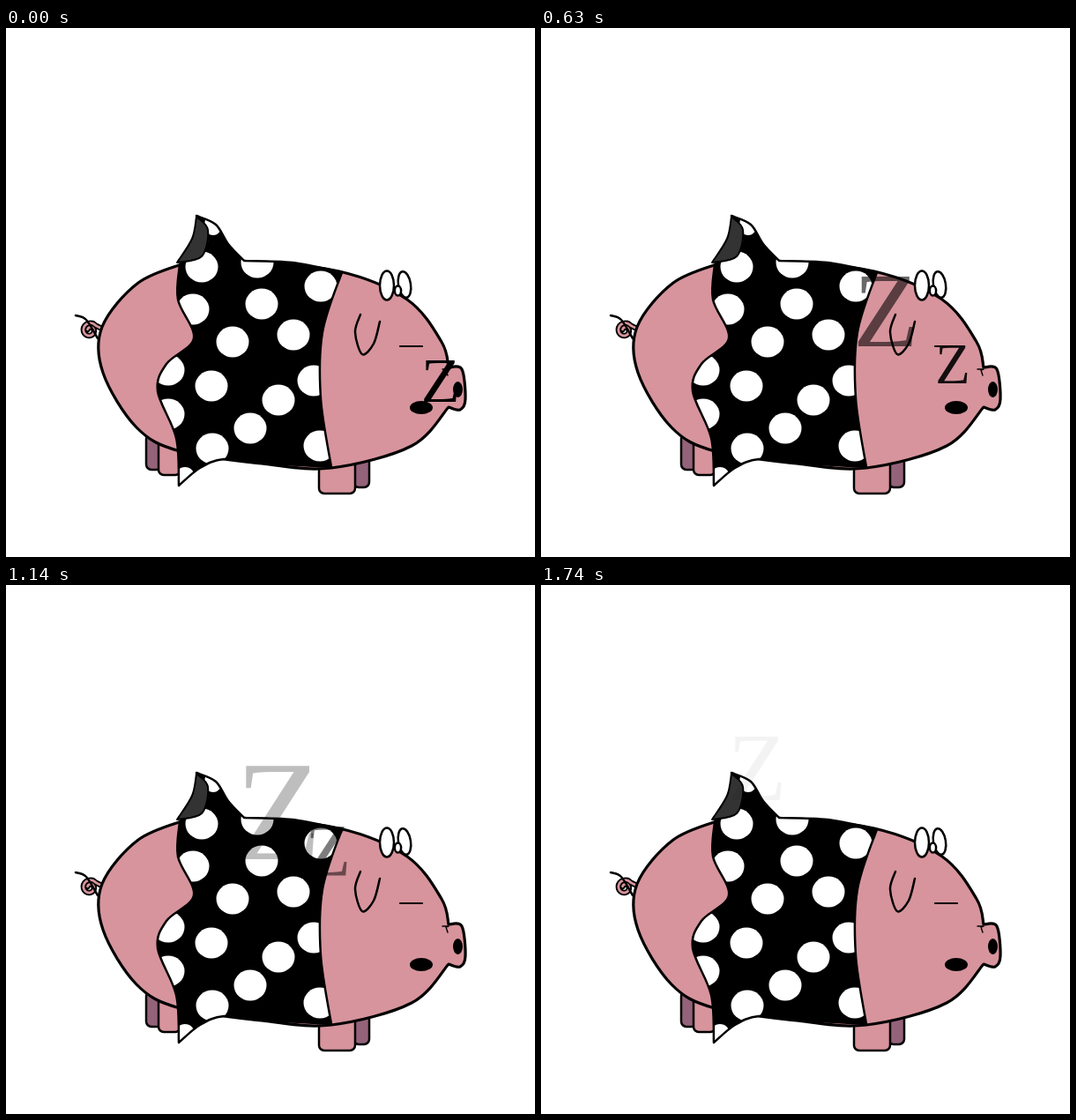
An HTML page with a canvas for the animation above (1800 ms loop, 600 by 600 pixels).

```html
<!DOCTYPE html>
<html lang="en">
<head>
<meta charset="utf-8">
<title>Sleeping pig</title>
<style>
html, body { margin: 0; width: 100%; height: 100%; overflow: hidden; background: #fff; }
canvas { display: block; width: 600px; height: 600px; }
</style>
</head>
<body>
<canvas id="stage" width="600" height="600"></canvas>
<script>
const LOOP = 1800, STEP = 30;
const PINK = '#d7949c', SHADE = '#94637a', INK = '#000', WHITE = '#fff';
const ctx = document.getElementById('stage').getContext('2d');

// Joins smooth curves, each given as x,y pairs; corners fall where they meet.
function shape(...parts) {
  const path = new Path2D();
  parts.forEach((p, part) => {
    const last = p.length / 2 - 1;
    const at = i => {
      const k = Math.max(0, Math.min(last, i)) * 2;
      return [p[k], p[k + 1]];
    };
    if (part) path.lineTo(...at(0));
    else path.moveTo(...at(0));
    for (let i = 0; i < last; i++) {
      const [a, b, c, d] = [at(i - 1), at(i), at(i + 1), at(i + 2)];
      path.bezierCurveTo(
        b[0] + (c[0] - a[0]) / 6, b[1] + (c[1] - a[1]) / 6,
        c[0] - (d[0] - b[0]) / 6, c[1] - (d[1] - b[1]) / 6, ...c);
    }
  });
  return path;
}

function oval(x, y, rx, ry = rx, turn = 0) {
  const path = new Path2D();
  path.ellipse(x, y, rx, ry, turn, 0, Math.PI * 2);
  return path;
}

function paint(g, path, fill, width = 2.5, line = INK) {
  if (fill) {
    g.fillStyle = fill;
    g.fill(path);
  }
  if (width) {
    g.lineWidth = width;
    g.strokeStyle = line;
    g.stroke(path);
  }
}

function drawLeg(g, x, y, w, h, fill) {
  const path = new Path2D();
  path.roundRect(x, y, w, h, 6);
  paint(g, path, fill);
}

function drawLegs(g) {
  drawLeg(g, 159, 460, 19, 41, SHADE);
  drawLeg(g, 173, 460, 25, 47, PINK);
  drawLeg(g, 394, 480, 18, 41, SHADE);
  drawLeg(g, 355, 480, 41, 48, PINK);
}

function drawTail(g) {
  const coil = [109, 341];
  for (let a = -0.6; a > -9; a -= 0.6) {
    const r = 9.5 + a * 0.75;
    coil.push(95 + r * Math.cos(a), 343 + r * Math.sin(a));
  }
  const tail = shape(coil);
  paint(g, tail, null, 6.5);
  paint(g, tail, null, 2.8, PINK);
  paint(g, shape([79, 326, 91, 331, 104, 352]));
}

function drawBody(g) {
  const back = [268, 264, 378, 276, 455, 308, 494, 356, 502, 385];
  const snout = [502, 385, 517, 387, 521, 421, 515, 433, 502, 430];
  const belly = [502, 430, 460, 474, 369, 499, 290, 494, 197, 480,
    148, 453, 110, 391, 109, 339, 150, 289, 205, 266];
  paint(g, shape(back, snout, belly), PINK, 3.2);
}

function drawBlanket(g) {
  const cloth = shape(
    [216, 213, 238, 223, 252, 245, 270, 264],
    [270, 264, 325, 266, 381, 277],
    [381, 277, 359, 345, 357, 420, 369, 498],
    [369, 498, 290, 493, 247, 489, 220, 499, 196, 519],
    [196, 519, 193, 465, 172, 412, 182, 381, 213, 352, 195, 308, 197, 268],
    [197, 268, 230, 244, 216, 213]);
  const dots = [
    [222, 271], [285, 266], [357, 293], [212, 319], [290, 313],
    [257, 356], [326, 348], [184, 388], [233, 406], [309, 422],
    [349, 400], [184, 438], [277, 454], [234, 477], [356, 474]
  ];
  paint(g, cloth, INK, 0);
  g.save();
  g.clip(cloth);
  for (const [x, y] of dots) paint(g, oval(x, y, 18.5, 17.5), WHITE, 0);
  paint(g, oval(235, 223, 10, 12), WHITE, 0);
  paint(g, oval(203, 509, 11), WHITE, 0);
  g.restore();
  paint(g, cloth);
  paint(g, shape([216, 214, 211, 239, 194, 266], [194, 266, 222, 259, 229, 229, 216, 214]), '#333', 2);
}

function drawFace(g) {
  paint(g, shape([402, 325, 396, 345, 404, 370, 417, 358, 424, 333]));
  paint(g, shape([447, 361, 472, 361]), null, 2.2);
  paint(g, oval(471, 430.5, 13, 7.5), INK, 0);
  paint(g, shape([495, 387, 502, 387], [499, 388, 501, 394]), null, 1.4);
  paint(g, oval(512.5, 410, 5.5, 9), INK, 0);
  paint(g, oval(452, 291, 7, 15, -0.16), WHITE);
  paint(g, oval(432, 292, 8, 16.5), WHITE);
  paint(g, oval(444.5, 298, 3.6, 5.5), WHITE);
}

function makePig() {
  const layer = document.createElement('canvas');
  layer.width = layer.height = 600;
  const g = layer.getContext('2d');
  g.lineCap = g.lineJoin = 'round';
  for (const part of [drawLegs, drawTail, drawBody, drawBlanket, drawFace]) part(g);
  return layer;
}

// Each letter drifts, grows and fades at a steady rate per ms.
const snores = [
  { start: 0, life: 1530, x: 493, y: 423.7, vx: -0.1615, vy: -0.099, size: 72.5, grow: 0.0775 },
  { start: 510, life: 1290, x: 491, y: 420, vx: -0.2, vy: -0.143, size: 60, grow: 0.04 }
];

function drawSnore(s, t) {
  const age = t - s.start;
  if (age < 0 || age >= s.life) return;
  ctx.globalAlpha = 1 - age / s.life;
  ctx.font = s.size + s.grow * age + 'px "Liberation Serif", "Times New Roman", serif';
  ctx.fillText('Z', s.x + s.vx * age, s.y + s.vy * age);
  ctx.globalAlpha = 1;
}

const pig = makePig();

function draw(now) {
  const t = Math.min(LOOP - 2 * STEP, Math.floor((now % LOOP) / STEP) * STEP);
  ctx.fillStyle = WHITE;
  ctx.fillRect(0, 0, 600, 600);
  ctx.drawImage(pig, 0, 0);
  ctx.fillStyle = INK;
  ctx.textAlign = 'center';
  for (const s of snores) drawSnore(s, t);
}

const begin = performance.now();
function tick() {
  draw(performance.now() - begin);
  requestAnimationFrame(tick);
}
tick();
</script>
</body>
</html>
```
